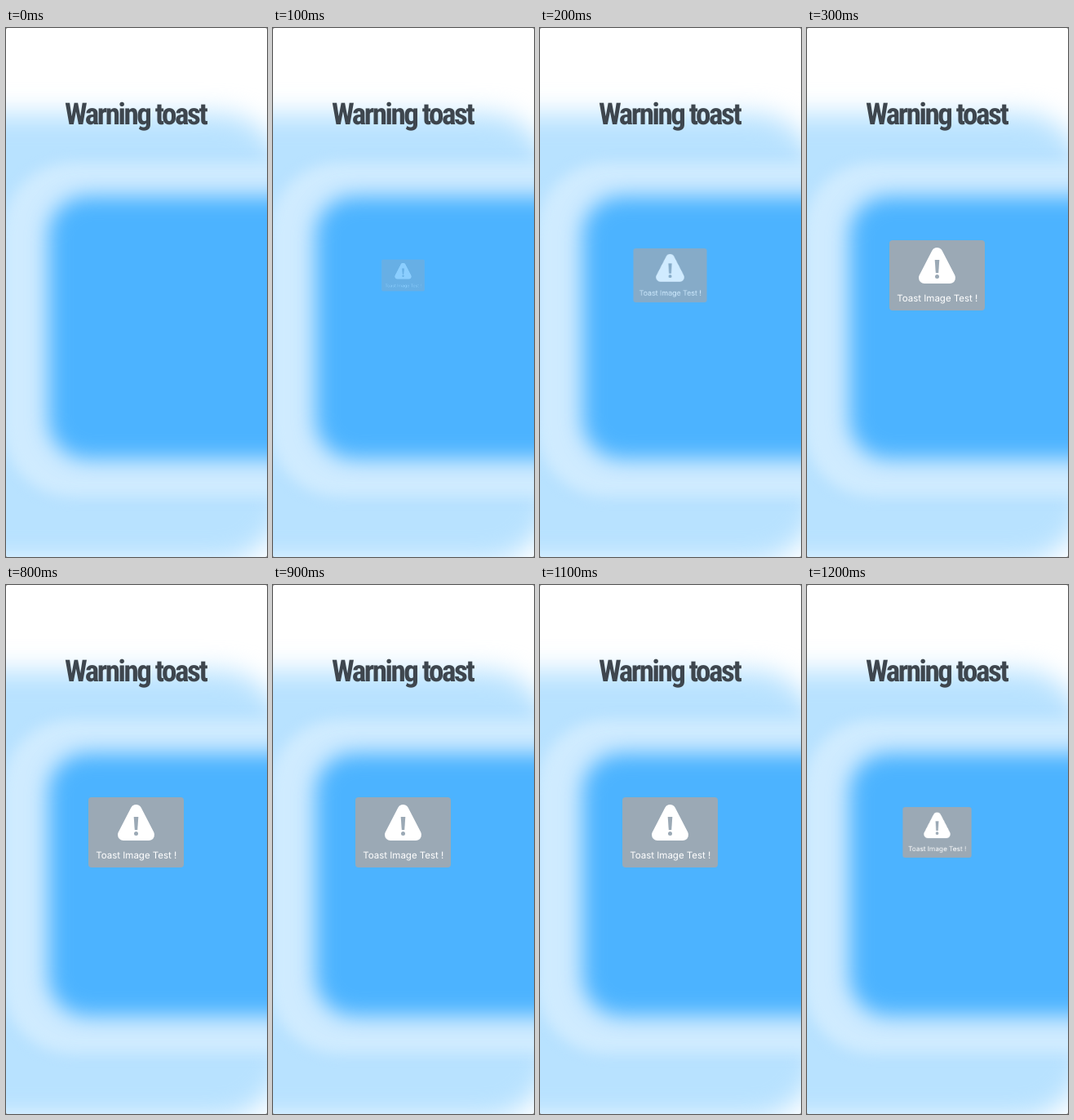
Write an HTML page that moves like this. It is 320 px wide and 648 px high and loops after 1.3 s.

```html
<!DOCTYPE html>
<html lang="en">
<head>
<meta charset="utf-8">
<title>Warning toast</title>
<style>
  html, body {
    margin: 0;
    width: 100%;
    height: 100%;
    overflow: hidden;
    background: #777;
  }
  .stage {
    position: relative;
    width: 320px;
    height: 648px;
    overflow: hidden;
    border-radius: 2px;
    background: #fff;
  }
  .glow { position: absolute; }
  .haze {
    left: -120px; top: 105px; width: 461px; height: 549px;
    border-radius: 80px;
    background: #b8e2ff;
    filter: blur(16px);
  }
  .ring {
    left: -4px; top: 165px; width: 440px; height: 409px;
    border-radius: 85px;
    background: #cfebff;
    filter: blur(8px);
  }
  .panel {
    left: 52px; top: 206px; width: 380px; height: 322px;
    border-radius: 48px;
    background: #4cb3ff;
    filter: blur(13px);
  }
  svg {
    position: absolute;
    inset: 0;
    text-rendering: geometricPrecision;
  }
  text { text-anchor: middle; }
  .title {
    font: bold 37px "Roboto Condensed", Roboto, sans-serif;
    font-stretch: condensed;
    letter-spacing: -2.4px;
    fill: #3e464e;
  }
  .label {
    font: 11.5px Inter, Roboto, sans-serif;
    fill: #fff;
  }
  .toast {
    transform-box: view-box;
    transform-origin: 159.5px 303px;
    animation: pop 1300ms step-end infinite;
  }
  /* Held poses, one every 100 ms while the toast opens and closes */
  @keyframes pop {
    0%      { transform: scale(0);   opacity: 0; }
    7.692%  { transform: scale(.45); opacity: .36; }
    15.384% { transform: scale(.77); opacity: .74; }
    23.076% { transform: scale(1);   opacity: 1; }
    92.307% { transform: scale(.72); opacity: 1; }
    100%    { transform: scale(0);   opacity: 0; }
  }
</style>
</head>
<body>
<div class="stage">
  <div class="glow haze"></div>
  <div class="glow ring"></div>
  <div class="glow panel"></div>
  <svg width="320" height="648" viewBox="0 0 320 648">
    <text class="title" x="158.8" y="117.5">Warning toast</text>
    <g class="toast">
      <rect x="101" y="260" width="117" height="86" rx="4" fill="#9ba9b5"/>
      <path d="M159.5 276L175 306H144Z" fill="#fff" stroke="#fff" stroke-width="14" stroke-linejoin="round"/>
      <path d="M156.7 284H162.3L161.2 300H157.8Z" fill="#9ba9b5"/>
      <circle cx="159.5" cy="304.6" r="2.5" fill="#9ba9b5"/>
      <text class="label" x="159.8" y="334.7">Toast Image Test !</text>
    </g>
  </svg>
</div>
</body>
</html>
```
